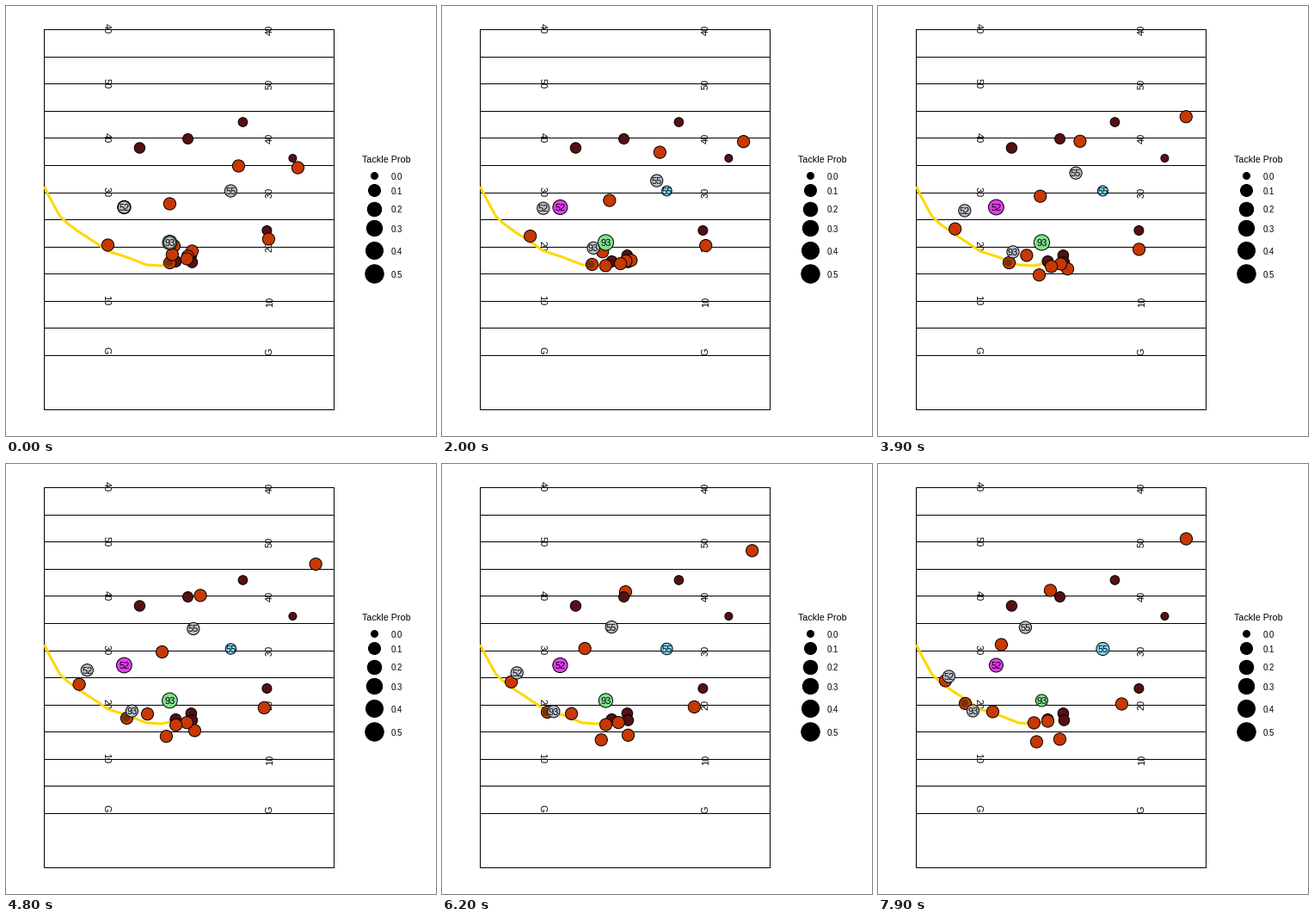
These frames come from a looping animation (500x500 px, 8000 ms). A matplotlib script:

```python
import numpy as np
import matplotlib.pyplot as plt
from matplotlib.animation import FuncAnimation

PX = 0.72  # points per pixel at 100 dpi
FRAMES = 80

ORANGE, MAROON, SILVER = "#c83803", "#561014", "#bac0c8"
GOLD, BALL = "#ffd700", "#6b3300"

# Runs: position at the start, halfway and at the end
WIDE = [
    [(339, 188), (358, 128), (358, 87)],
    [(270, 186), (234, 157), (200, 147)],
    [(190, 230), (188, 221), (143, 210)],
    [(118, 278), (89, 259), (78, 252)],
    [(305, 271), (303, 283), (283, 279)],
]
LINE = [
    [(195, 279), (172, 290), (133, 288)],
    [(216, 285), (220, 306), (211, 320)],
    [(211, 291), (212, 300), (197, 299)],
    [(210, 294), (201, 303), (181, 301)],
    [(193, 289), (187, 313), (184, 323)],
]
CARRIER = [[(190, 298), (151, 298), (101, 278)]]
CHASERS = [
    [(137, 234), (100, 238), (82, 247)],
    [(261, 215), (229, 194), (171, 190)],
    [(190, 275), (156, 286), (110, 287)],
]
NUMBERS = ["52", "55", "93"]

# Fixed spots: x, y, radius
DEEP = [(211, 154, 6.5)]
SPOTS = [(155, 165, 6.7), (275, 135, 5.8), (333, 177, 5), (303, 261, 6),
         (197, 297, 7), (215, 290, 6.8), (216, 298, 6.8)]
MARK_COLORS = ["#e43cf0", "#7fd4f2", "#7de28c"]
MARK_R = [[8.2, 9.4, 8.5], [6.5, 6.5, 8], [9, 9.6, 7.5]]

ROUTE = [(44, 210), (50, 222), (62, 244), (70, 252), (85, 263), (105, 276), (118, 285),
         (140, 292), (163, 301), (180, 302), (190, 300), (197, 297)]


def run(keys, frame):
    """Parabola through start, middle and end, with a slight ease at both ends."""
    a, m, b = np.moveaxis(np.asarray(keys, float), 1, 0)
    u = frame / (FRAMES - 1)
    u -= 0.02 * np.sin(2 * np.pi * u)
    return a + u * (4 * m - 3 * a - b) + 2 * u * u * (a + b - 2 * m)


def areas(radii):
    return (2 * (np.asarray(radii, float) - 0.5) * PX) ** 2


plt.rcParams["font.family"] = "Liberation Sans"
fig = plt.figure(figsize=(5, 5), dpi=100, facecolor="white")
ax = fig.add_axes([0, 0, 1, 1])
ax.set(xlim=(-0.4, 499.6), ylim=(500, 0))
ax.axis("off")


def dots(points, radii, color, z, edge="black", **kw):
    x, y = np.transpose(points)
    return ax.scatter(x, y, s=areas(radii), c=color, edgecolors=edge, snap=False,
                      linewidths=PX if edge != "none" else 0, zorder=z, **kw)


def spots(items, z):
    return dots([s[:2] for s in items], [s[2] for s in items], MAROON, z)


def label(x, y, text, px=11, z=20, **kw):
    kw = {"ha": "center", "va": "center", **kw}
    return ax.text(x, y, text, fontsize=px * PX, color="black", zorder=z, **kw)


def rule(xs, ys):
    ax.plot(xs, ys, color="black", lw=PX, antialiased=False, zorder=1)


# Field
for i in [*range(13), 14]:
    y = round(27.1 + 31.571 * i)
    rule([44, 381], [y, y])
for x in (44, 381):
    rule([x, x], [27, 469])
for i, name in enumerate(["40", "50", "40", "30", "20", "10", "G"]):
    y = 27 + 63.16 * i - (5 if name == "G" else 0)
    label(116, y - 0.5, name, z=2, rotation=270)
    label(306.6, y + 0.7, name, z=2, rotation=90)

# Legend
label(414, 179.3, "Tackle Prob", 10.7, ha="left")
for i, y in enumerate([196.5, 214, 235.5, 258, 284, 310.5]):
    dots([(428, y)], [4.5 + 6.7 * np.sqrt(i / 5)], "black", 3)
    label(447.4, y + 2, f"{i / 10:.1f}", 9.8, ha="left")

ax.plot(*zip(*ROUTE), color=GOLD, lw=3 * PX, zorder=3,
        solid_capstyle="butt", solid_joinstyle="round")

# Players
spots(SPOTS, 4)
spots(DEEP, 8)
groups = [(WIDE, ORANGE, 5), (CARRIER, ORANGE, 5.5), (LINE, ORANGE, 6), (CHASERS, SILVER, 10)]
movers = [(keys, dots(run(keys, 0), [7.6] * len(keys), color, z)) for keys, color, z in groups]
ball = dots(run(CARRIER, 0), [5], BALL, 5.8, edge="none", alpha=0.9)
homes = run(CHASERS, 0)
marks = dots(homes, [9] * 3, MARK_COLORS, 9)
for (x, y), n in zip(homes, NUMBERS):
    label(x, y + 1, n)
tags = [label(x, y + 1, n) for (x, y), n in zip(homes, NUMBERS)]


def update(frame):
    for keys, art in movers:
        art.set_offsets(run(keys, frame))
    ball.set_offsets(run(CARRIER, frame) - [1, 0])
    for tag, (x, y) in zip(tags, run(CHASERS, frame)):
        tag.set_position((x, y + 1))
        tag.set_visible(frame > 0)  # hidden while it sits exactly on its home number
    marks.set_sizes(areas(run(MARK_R, frame)))
    return []


anim = FuncAnimation(fig, update, frames=FRAMES, interval=100, repeat=True, repeat_delay=0)
plt.show()
```
